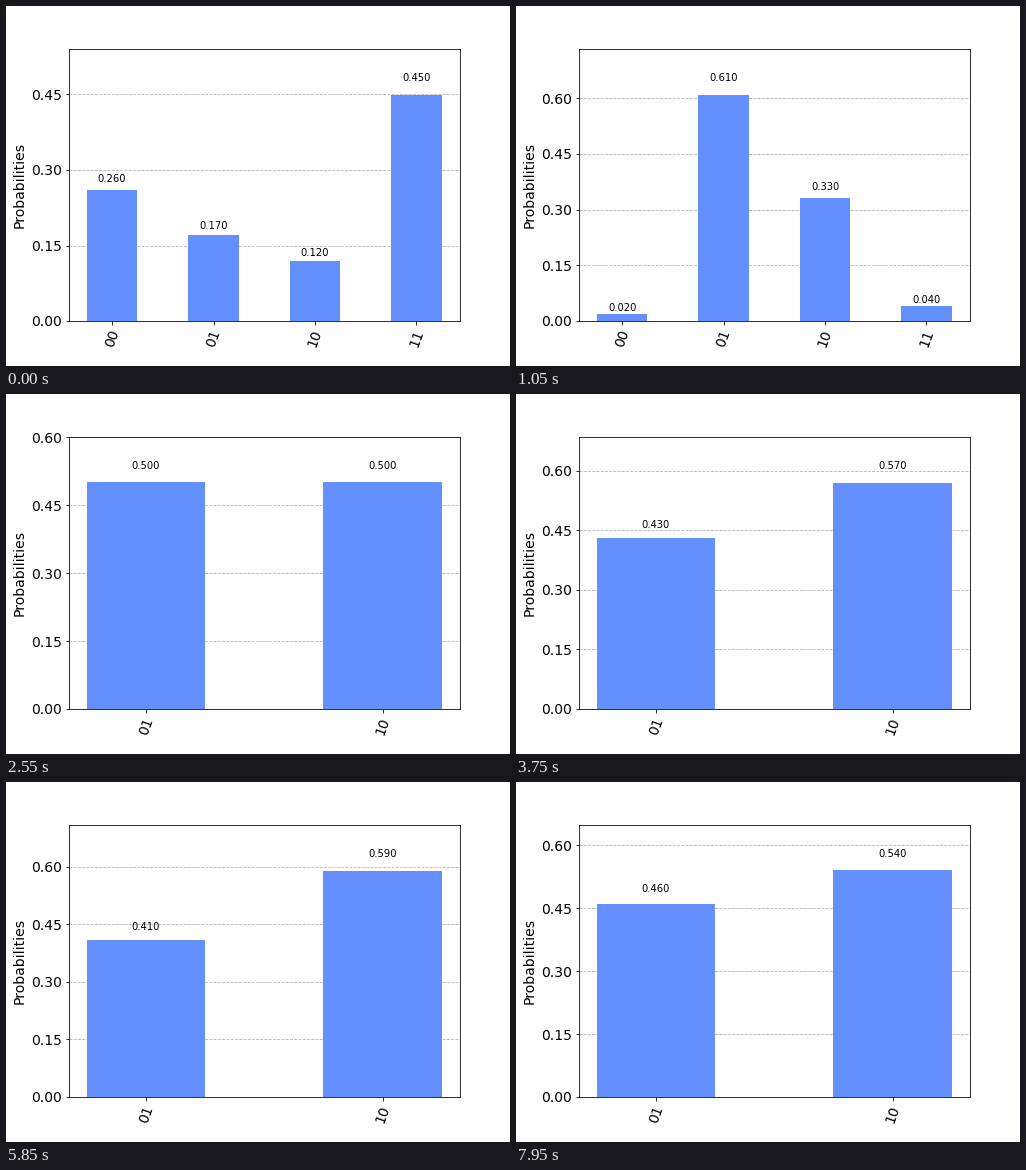
These frames come from a looping animation (504 by 360 pixels, 8 s). A matplotlib script:

```python
import matplotlib.pyplot as plt
import numpy as np
from matplotlib.animation import FuncAnimation
from matplotlib.ticker import MaxNLocator

plt.rcParams["font.family"] = "DejaVu Sans"

TICK_MS = 50
TICKS_PER_STEP = 3
LOOP_MS = 8000
STEP_COUNT = 54
PAUSED_STEP = 36  # repeats the step before it
SETTLED_STEP = 14  # only "01" and "10" remain from here on
STATES = ("00", "01", "10", "11")
BAR_COLOR = "#648fff"

# Key points: step -> shots out of 100 per state.
KEYS = {
    0: (26, 17, 12, 45),
    4: (4, 66, 24, 6),
    10: (0, 56, 43, 1),
    17: (0, 50, 50, 0),
    25: (0, 43, 57, 0),
    39: (0, 41, 59, 0),
    53: (0, 46, 54, 0),
}
noise = np.random.default_rng(5).integers(2, 4, STEP_COUNT)


def shot_counts(step):
    """Drift between the key points, with alternating shot noise once settled."""
    if step == PAUSED_STEP:
        step -= 1
    n00, n01, _, n11 = (round(np.interp(step, list(KEYS), column))
                        for column in zip(*KEYS.values()))
    if step >= SETTLED_STEP and step not in KEYS:
        n01 += (-1) ** step * int(noise[step])
    return n00, n01, 100 - n00 - n01 - n11, n11


fig, ax = plt.subplots(figsize=(7, 5), dpi=72, facecolor="white")
fig.subplots_adjust(left=0.125, right=0.9, bottom=0.125, top=0.88)


def draw(tick):
    counts = shot_counts(tick // TICKS_PER_STEP)
    probs = {s: n / 100 for s, n in zip(STATES, counts) if n}

    ax.clear()
    ax.bar(range(len(probs)), probs.values(), 0.5, color=BAR_COLOR, zorder=2)
    for x, p in enumerate(probs.values()):
        ax.text(x, 1.05 * p, f"{p:.3f}", ha="center", va="bottom",
                fontsize=10, zorder=3)

    ax.set_xticks(range(len(probs)), probs.keys(), fontsize=14, rotation=70)
    ax.set_ylabel("Probabilities", fontsize=14)
    ax.set_ylim(0, 1.2 * max(probs.values()))
    ax.yaxis.set_major_locator(MaxNLocator(5))
    ax.tick_params(axis="y", labelsize=14)
    ax.grid(axis="y", linestyle="--", zorder=0)


anim = FuncAnimation(fig, draw, frames=LOOP_MS // TICK_MS, interval=TICK_MS,
                     init_func=lambda: None, repeat=True, repeat_delay=0)
plt.show()
```
